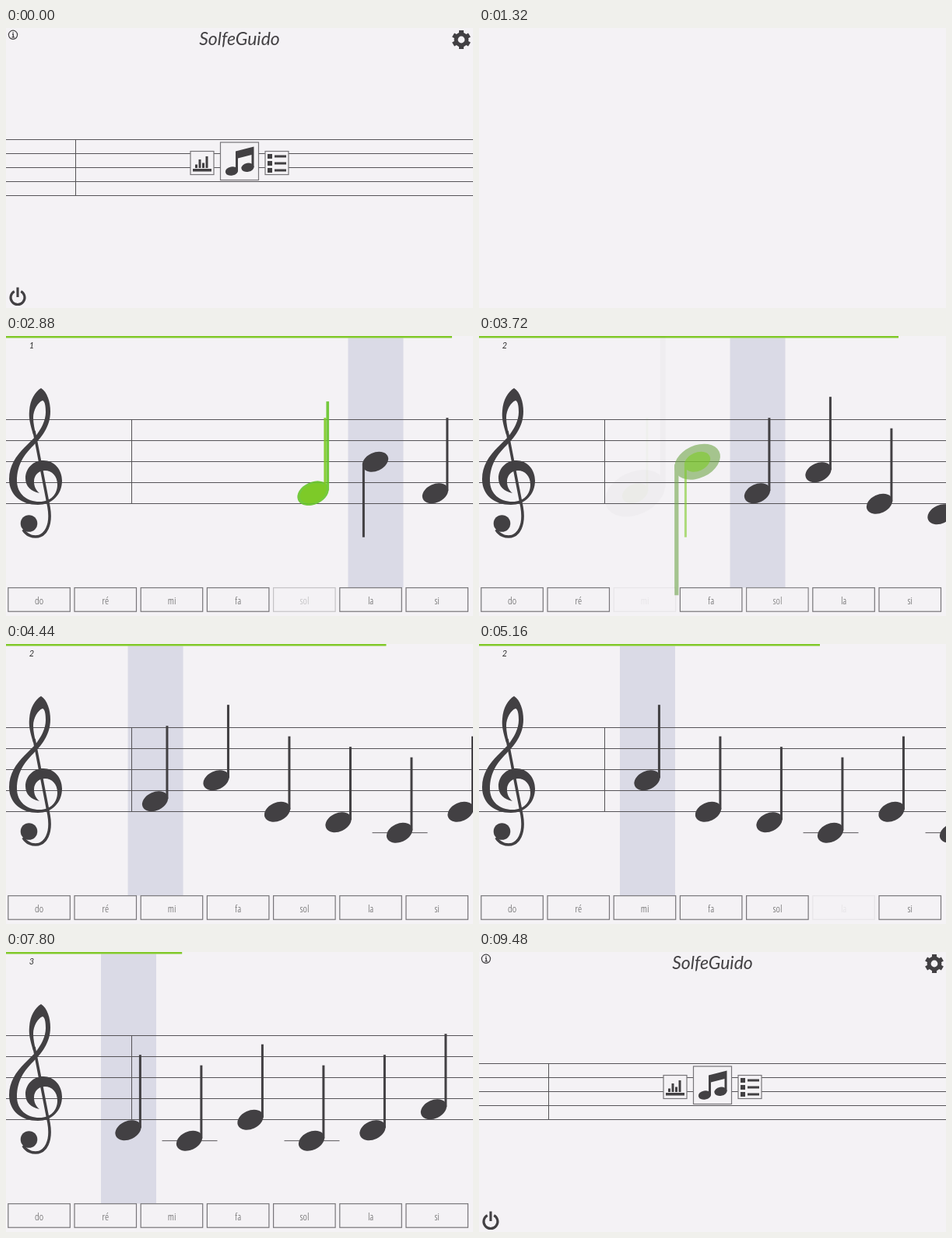
These frames come from a looping animation (600 by 360 pixels, 9600 ms). An HTML page:

```html
<!DOCTYPE html>
<html lang="en">
<head>
<meta charset="utf-8">
<title>Solfege trainer</title>
<style>
html, body { margin: 0; width: 100%; height: 100%; overflow: hidden; background: #f4f2f5; }
svg { display: block; width: 600px; height: 360px; }
.ink { fill: #424043; }
.line { fill: none; stroke: #555357; stroke-width: 1; }
.box { fill: #f4f2f5; stroke: #777579; stroke-width: 1.2; }
.logo { font: italic 23px Lato, cursive; fill: #424043; text-anchor: middle; }
.key { font: 300 13px "Open Sans", "Noto Sans", sans-serif; font-stretch: 75%; fill: #555; text-anchor: middle; }
.score { font: italic 11px Lato, sans-serif; fill: #333; text-anchor: middle; }
.answer { font: 28px "Open Sans", sans-serif; fill: #999; }
</style>
</head>
<body>
<svg viewBox="0 0 600 360">
  <g id="menu">
    <path class="line" d="M0 143.5H600M0 161.5H600M0 179.5H600M0 197.5H600M0 215.5H600M89.5 143V216"/>
    <text class="logo" x="300" y="22">SolfeGuido</text>
    <g fill="none" stroke="#424043">
      <circle cx="9" cy="8.8" r="5.6" stroke-width="1.2"/>
      <path d="M8 8H9.3V11.8M7.5 11.8H11M8.4 5.8H9.8" stroke-width="1.3"/>
      <circle cx="585" cy="15" r="6.9" stroke-width="5"/>
      <g id="teeth" stroke-width="6"></g>
      <path d="M10.8 338.6A9 9 0 1 0 19.2 338.6M15 333.5V346" stroke-width="3.1"/>
    </g>
    <rect class="box" x="237" y="158.5" width="30" height="30"/>
    <path class="ink" d="M240 181H264V184.5H240ZM243 175.5H246V180H243ZM247.5 169H250.5V180H247.5ZM252 173.5H255V180H252ZM256.5 165H259.5V180H256.5Z"/>
    <rect class="box" x="333" y="158.5" width="30" height="30"/>
    <path class="ink" d="M336 162H342V168H336ZM336 171H342V177H336ZM336 180H342V186H336ZM345 163.5H360V166.5H345ZM345 172.5H360V175.5H345ZM345 181.5H360V184.5H345Z"/>
    <g id="play">
      <rect class="box" x="275.5" y="147" width="49" height="48.5"/>
      <g class="ink">
        <path d="M295 158.5L318.5 152.5V179H315.5V163L298 167.5V184H295Z"/>
        <ellipse cx="290" cy="184" rx="8.2" ry="5.6" transform="rotate(-10 290 184)"/>
        <ellipse cx="310.5" cy="179.3" rx="8.2" ry="5.6" transform="rotate(-10 310.5 179.3)"/>
      </g>
    </g>
    <use id="pulse" href="#play"/>
  </g>
  <g id="game">
    <rect id="focus" y="2.5" width="71" height="321" fill="#dadae6"/>
    <rect id="bar" width="600" height="2.5" fill="#82c92b"/>
    <path class="line" d="M0 107.5H600M0 134.5H600M0 161.5H600M0 188.5H600M0 215.5H600M161.5 107V216"/>
    <path class="ink" d="M35 127C31 113 29 106 30 96C31 82 37 72 45 67C53 72 57 85 57 97C57 117 45 131 35 141C24 152 14 165 14 186C14 203 27 213 43 213C58 213 66 203 66 191C66 180 59 173 50 173C42 173 36 179 36 187C36 193 38 198 43 202C32 200 25 193 25 183C25 170 35 160 48 160C62 160 72 172 72 186C72 204 59 217 41 217C19 217 4 204 4 184C4 167 13 154 24 143L37 130C45 120 51 109 51 98C51 90 50 84 47 83C41 85 35 95 35 105C35 113 37 120 38 126Z"/>
    <path d="M36 122L55 220C59 243 51 258 38 258C30 258 25 254 22 249" fill="none" stroke="#424043" stroke-width="3.6"/>
    <circle class="ink" cx="29.5" cy="241" r="10.8"/>
    <text class="score" id="score" x="33" y="16"></text>
    <g id="notes"></g>
    <g id="keys"></g>
  </g>
</svg>
<script>
const LOOP = 9600, STEP = 120, GAP = 78.5;
const INK = '#424043', GREEN = '#7ecb26', RED = '#d65d7c';
const $ = id => document.getElementById(id);
const clamp = v => Math.max(0, Math.min(1, v));

function add(parent, tag, attrs, text) {
  const el = document.createElementNS('http://www.w3.org/2000/svg', tag);
  for (const k in attrs) el.setAttribute(k, attrs[k]);
  if (text) el.textContent = text;
  return parent.appendChild(el);
}
const set = (el, name, v) => el.setAttribute(name, v);

// piecewise linear value through [time, value] points
function at(points, t) {
  if (t <= points[0][0]) return points[0][1];
  for (let i = 1; i < points.length; i++) {
    const [a, p] = points[i - 1], [b, q] = points[i];
    if (t < b) return p + (q - p) * (t - a) / (b - a);
  }
  return points[points.length - 1][1];
}

const scroll = [[1900, 621], [2880, 394.5], [3720, 200.5], [4590, 0], [5075, 0],
  [5760, -157], [6229, -157], [6570, -235.5]];
const timeLeft = [[2300, 600], [2880, 573], [3720, 539], [5160, 438], [6240, 351], [8040, 207]];
const menuFade = [[1100, 1], [1320, 0], [8980, 0], [9440, 1]];
const gameFade = [[1640, 0], [2040, 1], [8580, 1], [8920, 0]];

const names = ['do', 'ré', 'mi', 'fa', 'sol', 'la', 'si'];
const pitches = [3, 6, 3, 5, 2, 1, 0, 2, 0, 1, 3, 2];
const answers = [[2790, true], [3330, true], [4860, false], [5280, true], [6210, false]];
const presses = [[4, 2790], [2, 3400], [5, 4860], [5, 5280], [0, 6060]];

for (let i = 0; i < 6; i++)
  add($('teeth'), 'path', { d: 'M585 7V3', transform: `rotate(${i * 60} 585 15)` });

const keys = names.map((name, i) => {
  const g = add($('keys'), 'g', {}), x = 2.8 + 85.2 * i;
  add(g, 'rect', { class: 'box', x, y: 323.7, width: 79.5, height: 30.5 });
  add(g, 'text', { class: 'key', x: x + 39.8, y: 344.7 }, name);
  return g;
});

function shape(parent, down) {
  const g = add(parent, 'g', {});
  add(g, 'ellipse', { rx: 17.5, ry: 11.8, transform: 'rotate(-25)' });
  add(g, 'rect', down ? { x: -16.6, y: 2, width: 3, height: 95 }
                      : { x: 13.9, y: -97, width: 3, height: 94 });
  return g;
}

const notes = pitches.map((pitch, i) => {
  const g = add($('notes'), 'g', {}), down = pitch > 5;
  const ghost = shape(g, down);
  if (!pitch) add(g, 'path', { class: 'line', d: 'M-35 0H36' });
  const body = shape(g, down);
  const label = add(g, 'text', { class: 'answer', x: -43, y: 26 }, names[pitch]);
  return { g, ghost, body, label, y: 242.7 - 13.5 * pitch, dx: down ? 1.5 : 0 };
});

function drawNote(n, i, t, start) {
  const answer = answers[i], age = answer ? t - answer[0] : -1;
  const done = age >= 0, good = done && answer[1], bad = done && !good;
  const alpha = !done ? 1 : good ? clamp(1 - age / 960) : clamp(1 - age / 300);
  set(n.g, 'transform', `translate(${start + GAP * i + n.dx} ${n.y})`);
  set(n.g, 'opacity', bad ? alpha * .8 : 1);
  set(n.body, 'fill', good ? GREEN : bad ? RED : INK);
  set(n.body, 'opacity', good ? alpha : 1);
  // the growing copy loses its colour as it fades
  set(n.ghost, 'fill', `hsl(96, ${Math.max(0, 72 - age * .085)}%, 47%)`);
  set(n.ghost, 'opacity', good ? alpha : 0);
  set(n.ghost, 'transform', `scale(${good ? 1 + 1.8 * (1 - Math.exp(-age / 700)) : 1})`);
  set(n.label, 'opacity', bad ? 1 : 0);
}

function keyAlpha(age) {
  if (age < 0) return 1;
  return age < 450 ? Math.max(.1, 1 - .9 * age / 130) : clamp(.1 + .9 * (age - 450) / 550);
}

function draw(t) {
  set($('menu'), 'opacity', at(menuFade, t));
  set($('game'), 'opacity', at(gameFade, t));

  const p = clamp((t - 60) / 1020);
  set($('pulse'), 'opacity', t < 120 ? 0 : .35 * (1 - p));
  set($('pulse'), 'transform', `translate(300 171.5) scale(${1 + 3 * p}) translate(-300 -171.5)`);

  const start = at(scroll, t), past = answers.filter(a => t >= a[0]);
  const n = notes[past.length];
  set($('focus'), 'x', start + GAP * past.length + n.dx - 35);
  set($('bar'), 'width', at(timeLeft, t));
  $('score').textContent = past.filter(a => a[1]).length;
  notes.forEach((note, i) => drawNote(note, i, t, start));
  keys.forEach((key, i) => set(key, 'opacity',
    Math.min(1, ...presses.filter(q => q[0] === i).map(q => keyAlpha(t - q[1])))));
}

const begin = performance.now();
function tick() {
  const t = (performance.now() - begin) % LOOP;
  draw(Math.floor(t / STEP) * STEP);
  requestAnimationFrame(tick);
}
tick();
</script>
</body>
</html>
```
